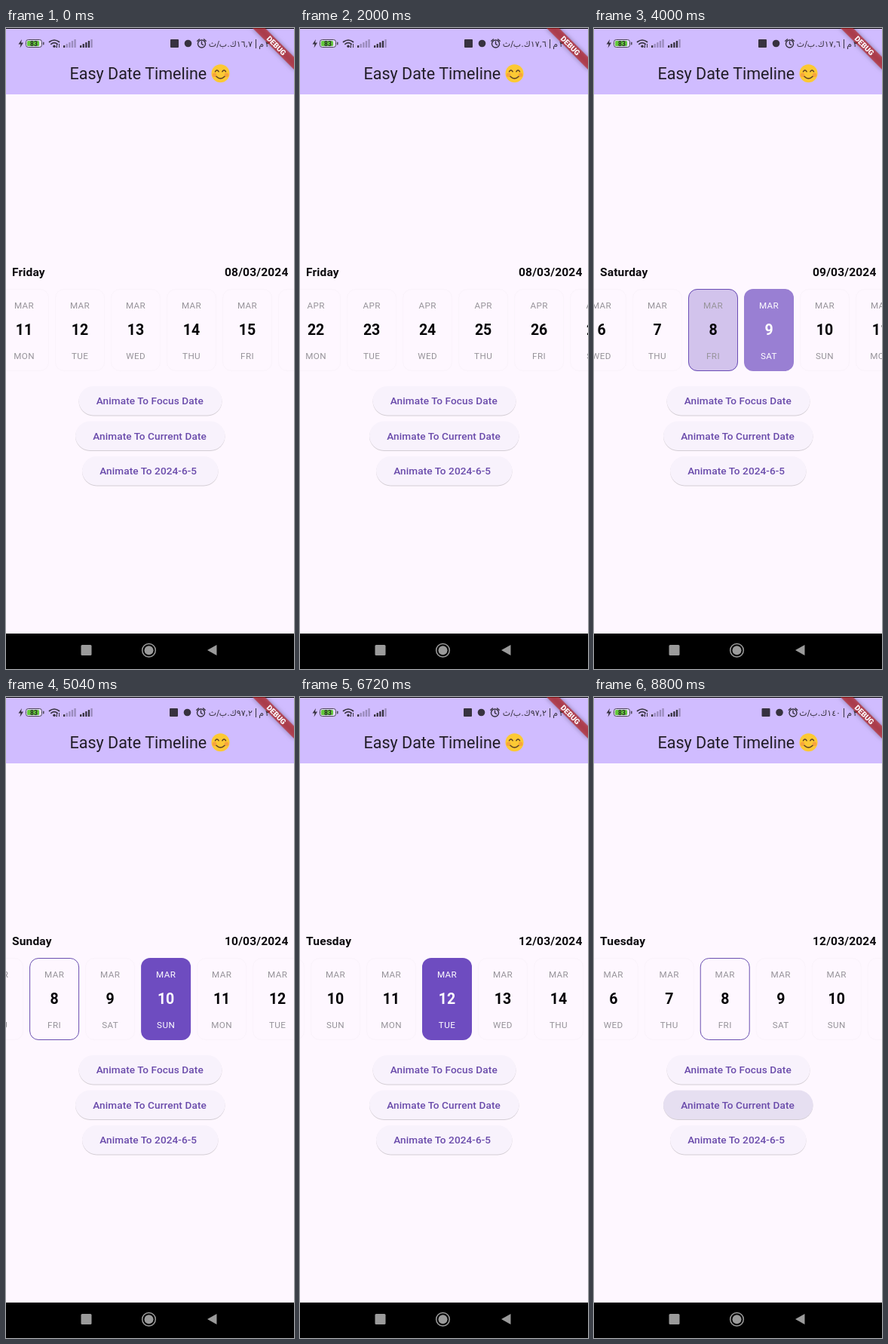
An HTML page that plays this animation: 382 by 850 pixels, repeating every 8880 ms.

```html
<!DOCTYPE html>
<html lang="en">
<head>
<meta charset="utf-8">
<title>Date timeline</title>
<style>
  html, body { margin: 0; width: 100%; height: 100%; overflow: hidden; background: #fef7ff; }
  svg { display: block; width: 382px; height: 850px; font-family: Roboto, sans-serif; }
  .title { font-size: 21.5px; fill: #211d27; }
  .head { font-size: 15.55px; font-weight: 700; letter-spacing: .15px; fill: #0c0a0e; }
  .small { font-size: 11.67px; letter-spacing: .4px; text-anchor: middle; }
  .num { font-size: 19.5px; font-weight: 700; text-anchor: middle; }
  .label { font-size: 13.6px; font-weight: 500; letter-spacing: .1px; fill: #6a4bab; }
  .arabic { font: 11px "DejaVu Sans", "Noto Sans", sans-serif; direction: rtl; fill: #37323f; }
  .debug { font-size: 9.9px; font-weight: 900; text-anchor: middle; fill: #fff; }
  .soft { filter: drop-shadow(0 1px .5px rgba(0, 0, 0, .17)); }
</style>
</head>
<body>
<svg id="stage" viewBox="0 0 382 850">
  <rect width="382" height="850" fill="#fef7ff"/>
  <rect width="382" height="88" fill="#d0bcff"/>
  <rect width="382" height="1" fill="#000"/>

  <!-- status bar, left -->
  <path d="M21 15l-4.500 6.500h3l-1 5 4.500-7h-3z" fill="#37323f"/>
  <rect x="26.500" y="15.500" width="21" height="10" rx="3" fill="#e3d8ff" stroke="#4a4552"/>
  <rect x="28" y="17" width="16" height="7" rx="1.500" fill="#63c83b"/>
  <rect x="49" y="18.500" width="1.500" height="4" rx=".7" fill="#4a4552"/>
  <text x="37" y="23.500" font-size="8.500" font-weight="700" text-anchor="middle" fill="#262a26">83</text>
  <g fill="none" stroke="#37323f" stroke-width="1.700" stroke-linecap="round">
    <path d="M57.500 18.500q6.500-5 13 0M59.800 21.300q4.200-3.300 8.400 0"/>
  </g>
  <circle cx="64" cy="24.300" r="1.700" fill="#37323f"/>
  <path d="M67.500 21v5m-1.500-1.500l1.500 1.700M70.500 26v-5" fill="none" stroke="#37323f"/>
  <g id="bars"></g>

  <!-- status bar, right -->
  <g id="notices" fill="#37323f">
    <rect x="218" y="15" width="11" height="11" rx="1"/>
    <circle cx="241.500" cy="20.500" r="4.800"/>
    <g fill="none" stroke="#37323f" stroke-width="1.400" stroke-linecap="round">
      <circle cx="259.500" cy="21" r="5"/>
      <path d="M259.500 18v3.200l2 1.300M253.800 17.300l2.600-2.300M265.200 17.300l-2.600-2.300"/>
    </g>
  </g>
  <text id="speed" class="arabic" x="327" y="24.500"></text>
  <path d="M331.500 15v12" stroke="#37323f"/>
  <text class="arabic" x="342" y="24.500">م</text>
  <text class="arabic" x="350" y="24.500">٣</text>

  <text class="title" x="84.500" y="67.700">Easy Date Timeline</text>
  <g transform="translate(284.500 60.300)">
    <circle r="12" fill="#fcc934"/>
    <circle cx="-8" cy="2" r="2.800" fill="#f58c42" opacity=".6"/>
    <circle cx="8" cy="2" r="2.800" fill="#f58c42" opacity=".6"/>
    <g fill="none" stroke="#593d25" stroke-width="1.500" stroke-linecap="round">
      <path d="M-7-2.500q2.300-3.500 4.600 0M2.400-2.500q2.300-3.500 4.600 0M-5.500 4q5.500 5.500 11 0"/>
    </g>
  </g>

  <!-- debug banner -->
  <g transform="translate(382 0) rotate(45)">
    <rect x="-40" y="27.200" width="80" height="11.700" fill="#b71c1c" fill-opacity=".68"
      style="filter: drop-shadow(0 0 3px rgba(0, 0, 0, .5))"/>
    <text class="debug" y="36.600">DEBUG</text>
  </g>

  <text id="weekday" class="head" x="8" y="328.500"></text>
  <text id="date" class="head" x="374.500" y="328.500" text-anchor="end"></text>
  <g id="tiles"></g>
  <g id="buttons"></g>

  <rect y="803" width="382" height="47" fill="#000"/>
  <g fill="#9b9b9b">
    <rect x="99.500" y="818" width="14" height="14" rx="1.500"/>
    <circle cx="189.500" cy="825.300" r="6"/>
    <circle cx="189.500" cy="825.300" r="8.800" fill="none" stroke="#9b9b9b" stroke-width="1.500"/>
    <path d="M267 825l12.500-7v14z"/>
  </g>
</svg>
<script>
const LOOP = 8880, STEP = 80;
const PITCH = 74, CENTER = 195, SCROLL_MS = 320, FADE_MS = 230, TODAY = 8;
const PURPLE = '#6e4cc0';
const DAYS = ['Sunday', 'Monday', 'Tuesday', 'Wednesday', 'Thursday', 'Friday', 'Saturday'];
const MONTHS = ['JAN', 'FEB', 'MAR', 'APR', 'MAY', 'JUN'];

const linear = p => p;
const fling = p => 1 - (1 - p) ** 2;

// Days count from 1 March: [start, duration, day reached, easing]
const START_DAY = 13.31;
const MOVES = [
  [0, 750, 27, fling], [700, 700, 42, fling], [1300, 700, 55.35, fling],
  [2860, SCROLL_MS, 8, linear],
  [3840, SCROLL_MS, 9, linear], [4794, SCROLL_MS, 10, linear],
  [5560, SCROLL_MS, 11, linear], [6200, SCROLL_MS, 12, linear],
  [8503, SCROLL_MS, 8, linear]
];
const PICKS = [[-1000, 8], [3840, 9], [4794, 10], [5560, 11], [6200, 12]];
const SPEEDS = [[0, '١٦,٧', 0], [1000, '١٧,٦', 0], [4560, '٩٧,٢', -1], [8120, '١٤٠', 4.5]];
// [button, down, up]
const PRESSES = [[1, 2680, 2860], [0, 7420, 7600], [1, 8380, 8830]];
const BUTTONS = [
  ['Animate To Focus Date', 96.5, 190, 475],
  ['Animate To Current Date', 92, 198.5, 521.5],
  ['Animate To 2024-6-5', 101, 180.5, 568]
];

const byId = id => document.getElementById(id);
const clamp = v => Math.max(0, Math.min(1, v));
const latest = (table, t) => table.filter(row => row[0] <= t).pop();

function add(parent, tag, attrs) {
  const node = document.createElementNS('http://www.w3.org/2000/svg', tag);
  return set(parent.appendChild(node), attrs);
}

function set(node, attrs) {
  for (const key in attrs) node.setAttribute(key, attrs[key]);
  return node;
}

for (const [x, lit] of [[76, 1], [98, 4]]) {
  for (let i = 0; i < 5; i++) {
    const h = 3 + i * 2;
    add(byId('bars'), 'rect', {
      x: x + i * 3.6, y: 26 - h, width: 2.3, height: h, rx: .6,
      fill: '#37323f', opacity: i < lit ? 1 : .35
    });
  }
}

const tiles = Array.from({ length: 8 }, () => {
  const group = add(byId('tiles'), 'g', {});
  const box = { x: -32.5, y: 346.5, width: 65, height: 108, rx: 11.5 };
  return {
    group,
    frame: add(group, 'rect', { ...box, fill: 'none' }),
    fill: add(group, 'rect', { x: -33, y: 346, width: 66, height: 109, rx: 12, fill: PURPLE }),
    month: add(group, 'text', { class: 'small', y: 371.5 }),
    num: add(group, 'text', { class: 'num', y: 407 }),
    day: add(group, 'text', { class: 'small', y: 439 })
  };
});

const overlays = BUTTONS.map(([text, x, width, y]) => {
  const box = { x, y, width, height: 38.5, rx: 19.25 };
  add(byId('buttons'), 'rect', { ...box, fill: '#f8f2fc', class: 'soft' });
  const overlay = add(byId('buttons'), 'rect', { ...box, fill: '#6750a4' });
  add(byId('buttons'), 'text', { class: 'label', x: x + 23.2, y: y + 24 }).textContent = text;
  return overlay;
});

function scrollDay(t) {
  let day = START_DAY;
  for (const [start, duration, to, ease] of MOVES) {
    if (t > start) day += (to - day) * ease(clamp((t - start) / duration));
  }
  return day;
}

function drawTile(tile, day, scroll, t) {
  const date = new Date(2024, 2, day);
  const index = PICKS.findIndex(pick => pick[1] === day);
  let alpha = 0;
  if (index >= 0) {
    alpha = clamp((t - PICKS[index][0]) / FADE_MS);
    const next = PICKS[index + 1];
    if (next) alpha -= clamp((t - next[0]) / FADE_MS);
  }
  const selected = latest(PICKS, t)[1] === day;
  const gray = selected ? '#fff' : '#969399';
  set(tile.group, { transform: `translate(${CENTER + (day - scroll) * PITCH} 0)` });
  set(tile.frame, { stroke: day === TODAY ? '#6a4fb0' : '#faf3fb' });
  set(tile.fill, { opacity: alpha });
  set(tile.month, { fill: gray }).textContent = MONTHS[date.getMonth()];
  set(tile.num, { fill: selected ? '#fff' : '#050407' }).textContent = date.getDate();
  set(tile.day, { fill: gray }).textContent = DAYS[date.getDay()].slice(0, 3).toUpperCase();
}

function draw(t) {
  const scroll = scrollDay(t);
  const first = Math.floor(scroll) - 3;
  tiles.forEach((tile, i) => drawTile(tile, first + i, scroll, t));

  const picked = latest(PICKS, t)[1];
  byId('weekday').textContent = DAYS[new Date(2024, 2, picked).getDay()];
  byId('date').textContent = String(picked).padStart(2, '0') + '/03/2024';

  const [, speed, shift] = latest(SPEEDS, t);
  byId('speed').textContent = speed + 'ك.ب/ث';
  set(byId('notices'), { transform: `translate(${shift} 0)` });

  overlays.forEach((overlay, i) => {
    const levels = PRESSES.filter(press => press[0] === i).map(([, down, up]) =>
      Math.min(clamp((t - down) / 150), 1 - clamp((t - up) / 200)));
    set(overlay, { opacity: .12 * Math.max(0, ...levels) });
  });
}

const begin = performance.now();
function tick() {
  const t = (performance.now() - begin) % LOOP;
  draw(Math.floor(t / STEP) * STEP);
  requestAnimationFrame(tick);
}
tick();
</script>
</body>
</html>
```
